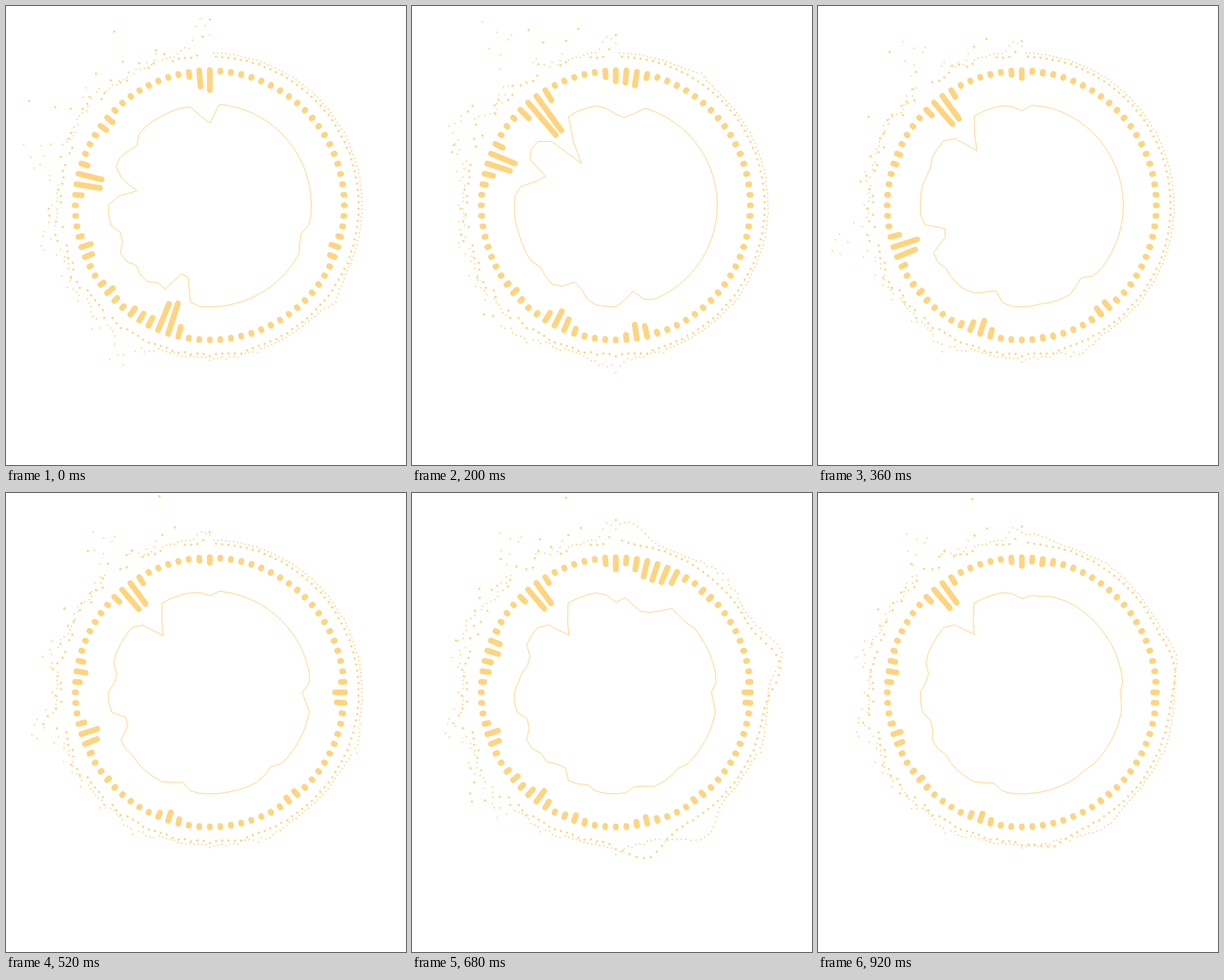
An HTML page with a canvas for the animation above (0.96 s loop, 530 px wide and 608 px high).

```html
<!DOCTYPE html>
<html>
<head>
<meta charset="utf-8">
<title>Circular audio visualizer</title>
<style>
  html, body { margin: 0; width: 100%; height: 100%; overflow: hidden; background: #fff; }
  canvas { display: block; }
</style>
</head>
<body>
<canvas id="stage" width="530" height="608"></canvas>
<script>
const ctx = document.getElementById('stage').getContext('2d');
const CX = 270, CY = 264;
const LOOP = 960, STEP = 40;
const BARS = 80, DEG_PER_BAR = 360 / BARS, PEAK_WIDTH = 1.25;

// Each beat strikes a few peaks [bar, height], which then fade exponentially.
// Bars count anticlockwise from the top.
const beats = [
  { at: 0, fade: 100, peaks: [[1, 10], [11.5, 11], [17.5, 37], [24.3, 14], [32.5, 12], [35.6, 47], [55.8, 10]] },
  { at: 0, fade: 500, peaks: [[0, 21], [29, 10]] },
  { at: 200, fade: 80, peaks: [[8.5, 25], [15.4, 38], [34, 20], [42.3, 20], [78.4, 20]] },
  { at: 200, fade: 9000, peaks: [[8.5, 41]] },
  { at: 360, fade: 400, peaks: [[24.3, 35], [36, 17], [48.5, 12]] },
  { at: 520, fade: 400, peaks: [[18, 12], [59.7, 14]] },
  { at: 600, fade: 100, peaks: [[15.6, 35], [32, 39], [42.9, 20], [70.5, 12], [74.5, 42], [76.5, 46]] },
  { at: 600, fade: 800, peaks: [[0, 12], [29, 6], [78.3, 11]] },
  { at: 760, fade: 90, peaks: [[17.9, 38], [35.9, 36], [24.3, 12]] }
];

const strength = (t, { at, fade }) => t < at ? 0 : Math.exp((at - t) / fade);
const rad = deg => deg * Math.PI / 180;
const hash = n => {
  const s = Math.sin(n * 127.1 + 11.7) * 43758.5453;
  return s - Math.floor(s);
};

function level(bar, t) {
  let sum = 0;
  for (const beat of beats) {
    const power = strength(t, beat);
    for (const [pos, height] of beat.peaks) {
      sum += power * height * Math.exp(-(((bar - pos) / PEAK_WIDTH) ** 2));
    }
  }
  return sum;
}

const polar = (deg, r) => [CX - r * Math.sin(rad(deg)), CY - r * Math.cos(rad(deg))];

function drawBars(t) {
  ctx.lineWidth = 7.5;
  ctx.lineCap = 'round';
  ctx.beginPath();
  for (let i = 0; i < BARS; i++) {
    const deg = i * DEG_PER_BAR;
    ctx.moveTo(...polar(deg, 179));
    ctx.lineTo(...polar(deg, 179 - Math.max(1.5, level(i, t))));
  }
  ctx.stroke();
}

function drawOutline(t) {
  ctx.lineWidth = 1;
  ctx.beginPath();
  for (let i = 0; i < 64; i++) {
    const deg = i * 360 / 64;
    ctx.lineTo(...polar(deg, 135.5 - Math.max(1, level(deg / DEG_PER_BAR, t))));
  }
  ctx.closePath();
  ctx.stroke();
}

// Waves that the 600 ms beat sends along the treble half of the dot rings.
function treble(deg, t, waves, crest) {
  if (deg < 175) return 0;
  const wave = Math.max(0, Math.cos(waves * rad(deg - crest)));
  return 34 * wave ** 4 * strength(t, { at: 600, fade: 220 });
}

function drawDots(count, size, radius, offset) {
  for (let i = 0; i < count; i++) {
    const deg = i * 360 / count;
    const noise = hash(i + count);
    const unrest = deg > 12 && deg < 140 ? 12 : deg < 200 ? 4 : 1.2;
    ctx.beginPath();
    ctx.arc(...polar(deg, radius + unrest * noise ** 3 + offset(deg, noise)), size, 0, 2 * Math.PI);
    ctx.fill();
  }
}

function draw(now) {
  const t = Math.floor(now % LOOP / STEP) * STEP;
  ctx.clearRect(0, 0, 530, 608);
  ctx.fillStyle = ctx.strokeStyle = '#ffd47f';
  drawBars(t);
  drawOutline(t);
  // The rings show the same spectrum on finer scales.
  drawDots(150, 1.5, 197, deg =>
    1.8 * level(deg / DEG_PER_BAR / .37, t) + treble(deg, t, 4, 280));
  drawDots(240, 1, 201.5, (deg, noise) =>
    2.1 * (1 - deg / 400) * (.4 + .6 * noise) * level(deg / DEG_PER_BAR / .93, t) + treble(deg, t, 5, 284));
}

const start = performance.now();
function tick() {
  draw(performance.now() - start);
  requestAnimationFrame(tick);
}
tick();
</script>
</body>
</html>
```
